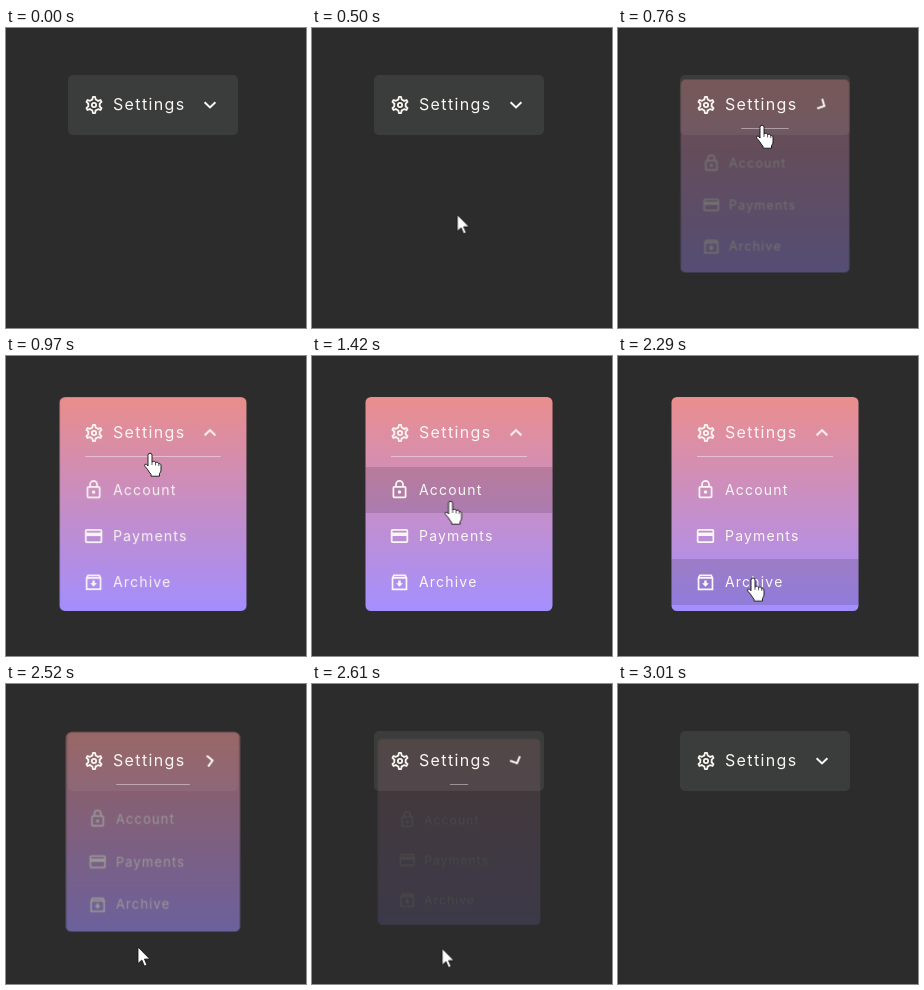
Recreate the animation shown at these times as an HTML page. Size 300x300 px, loop 3.37 s.

```html
<!DOCTYPE html>
<html lang="en">
<head>
<meta charset="utf-8">
<title>Settings menu</title>
<style>
  html, body { margin: 0; width: 100%; height: 100%; overflow: hidden; background: #2c2c2c; }
  svg { display: block; width: 100vw; height: 100vh; }
  text { font: 400 14px Inter, "Open Sans", sans-serif; letter-spacing: 1.2px; fill: #faf6f2; }
  .title { font-size: 16px; letter-spacing: 1.35px; }
  .icon { fill: none; stroke: #faf6f2; stroke-width: 2; }
  .solid { fill: #faf6f2; stroke: none; }

  .menu, .rule, .chevron, .band, .cursor, .arrow, .hand {
    animation: 3370ms linear infinite;
  }
  .menu { transform-origin: 147px 148px; animation-name: menu; }
  .rule { transform-origin: 147px 100px; animation-name: rule; }
  .chevron { transform-origin: 204px 76.8px; animation-name: chevron; }
  .cursor { animation-name: cursor; }
  .band { fill: #000; animation-timing-function: step-end; }
  .account { animation-name: account; }
  .payments { animation-name: payments; }
  .archive { animation-name: archive; }
  .arrow { animation-name: arrow; animation-timing-function: step-end; }
  .hand { animation-name: hand; animation-timing-function: step-end; }

  /* opens 694-994 ms, closes 2439-2739 ms */
  @keyframes menu {
    0%, 20.593% { opacity: 0; transform: scale(.85); animation-timing-function: ease; }
    29.496%, 72.374% { opacity: 1; transform: scale(1); animation-timing-function: ease; }
    81.276%, 100% { opacity: 0; transform: scale(.85); }
  }
  @keyframes rule {
    0%, 20.593% { transform: scaleX(0); animation-timing-function: ease; }
    29.496%, 72.374% { transform: scaleX(1); animation-timing-function: ease; }
    81.276%, 100% { transform: scaleX(0); }
  }
  @keyframes chevron {
    0%, 20.593% { transform: rotate(0deg); animation-timing-function: ease; }
    29.496%, 72.374% { transform: rotate(-180deg); animation-timing-function: ease; }
    81.276%, 100% { transform: rotate(0deg); }
  }
  @keyframes cursor {
    0%, 6.825% { transform: translate(147px, 303px); }
    21.068% { transform: translate(144px, 97px); }
    33.828% { transform: translate(144px, 97px); animation-timing-function: ease-in-out; }
    47.478% { transform: translate(136px, 167px); }
    53.412% { transform: translate(136px, 167px); animation-timing-function: ease-in-out; }
    61.128% { transform: translate(135px, 221.5px); }
    67.953% { transform: translate(135px, 221.5px); animation-timing-function: ease-out; }
    74.777% { transform: translate(132px, 263px); animation-timing-function: ease-out; }
    81.01% { transform: translate(129px, 265.5px); }
    85.46% { transform: translate(129px, 265.5px); animation-timing-function: ease-in; }
    89.318%, 100% { transform: translate(129.5px, 303px); }
  }
  @keyframes account {
    0% { opacity: 0; } 37.77% { opacity: .13; } 44.07%, 100% { opacity: 0; }
  }
  @keyframes payments {
    0% { opacity: 0; } 44.07% { opacity: .13; } 57.98%, 100% { opacity: 0; }
  }
  @keyframes archive {
    0% { opacity: 0; } 57.98% { opacity: .13; } 71.2%, 100% { opacity: 0; }
  }
  @keyframes arrow {
    0% { opacity: 1; } 20.4% { opacity: 0; } 71.2%, 100% { opacity: 1; }
  }
  @keyframes hand {
    0% { opacity: 0; } 20.4% { opacity: 1; } 71.2%, 100% { opacity: 0; }
  }
</style>
</head>
<body>
<svg viewBox="0 0 300 300">
  <defs>
    <linearGradient id="fade" x1="0" y1="0" x2="0" y2="1">
      <stop offset="0" stop-color="#eb8e8d"/>
      <stop offset="1" stop-color="#a48fff"/>
    </linearGradient>
    <path id="tooth" d="M-1.85-6.2L-1.2-9H1.2L1.85-6.2L4.44-4.7"/>
  </defs>

  <rect x="62" y="47" width="170" height="60" rx="5" fill="#3b3c3c"/>

  <g class="menu">
    <rect x="53.5" y="41" width="187" height="214" rx="5.5" fill="url(#fade)"/>
    <rect class="band account" x="53.5" y="111" width="187" height="46"/>
    <rect class="band payments" x="53.5" y="157" width="187" height="46"/>
    <rect class="band archive" x="53.5" y="203" width="187" height="46"/>

    <g class="icon" transform="translate(87.5 133.5) scale(.87) translate(-12 -12)">
      <rect x="5" y="9" width="14" height="12" rx="1"/>
      <path d="M8 9V6a4 4 0 0 1 8 0V9"/>
      <circle class="solid" cx="12" cy="15" r="2"/>
    </g>
    <text x="107" y="139">Account</text>

    <g class="icon" transform="translate(87.5 180) scale(.87) translate(-12 -12)">
      <rect x="3" y="5" width="18" height="14" rx="1"/>
      <path class="solid" d="M3 8H21V12H3z"/>
    </g>
    <text x="107" y="185">Payments</text>

    <g class="icon" transform="translate(87.5 226.3) scale(.87) translate(-12 -12)">
      <path d="M4 7L5.5 4H18.5L20 7V20H4zM4 7H20"/>
      <path class="solid" d="M16 13H13.45V10H10.55V13H8L12 17z"/>
    </g>
    <text x="107" y="231">Archive</text>
  </g>

  <rect class="rule" x="79" y="100" width="136" height="1" fill="#fff" fill-opacity=".42"/>

  <g class="icon" transform="translate(88 77) scale(.9)" stroke-linecap="round" stroke-linejoin="round">
    <use href="#tooth"/>
    <use href="#tooth" transform="rotate(60)"/>
    <use href="#tooth" transform="rotate(120)"/>
    <use href="#tooth" transform="rotate(180)"/>
    <use href="#tooth" transform="rotate(240)"/>
    <use href="#tooth" transform="rotate(300)"/>
    <circle r="2.4"/>
  </g>
  <text class="title" x="107" y="82">Settings</text>
  <path class="icon chevron" d="M198.6 74.2L204 79.4L209.4 74.2"/>

  <g class="cursor">
    <path class="arrow" d="M0 0V16.5L3.8 13L6.4 19L9 18L6.4 12H11.8z" fill="#fff" stroke="#111" stroke-width=".8"/>
    <g class="hand" stroke="#111" stroke-width=".9" stroke-linejoin="round">
      <path fill="#fff" d="M-2 2.2a2 2 0 0 1 4 0V9q1-1 2.5-.6 1 .3 1.1 1.3 1-.8 2.2-.3 1 .4 1 1.4 1.1-.4 1.7.3.5.5.5 1.6V17q0 2-1.5 3.5V23.2H1V21.3Q-1 19-2.2 16.8Q-3.5 15-5 13.5Q-6 12-4.8 11.2Q-3.5 10.7-2 13z"/>
      <path fill="none" stroke-width=".7" d="M2 9v3M5.6 9.7v2.8M8.8 11v2"/>
    </g>
  </g>
</svg>
</body>
</html>
```
